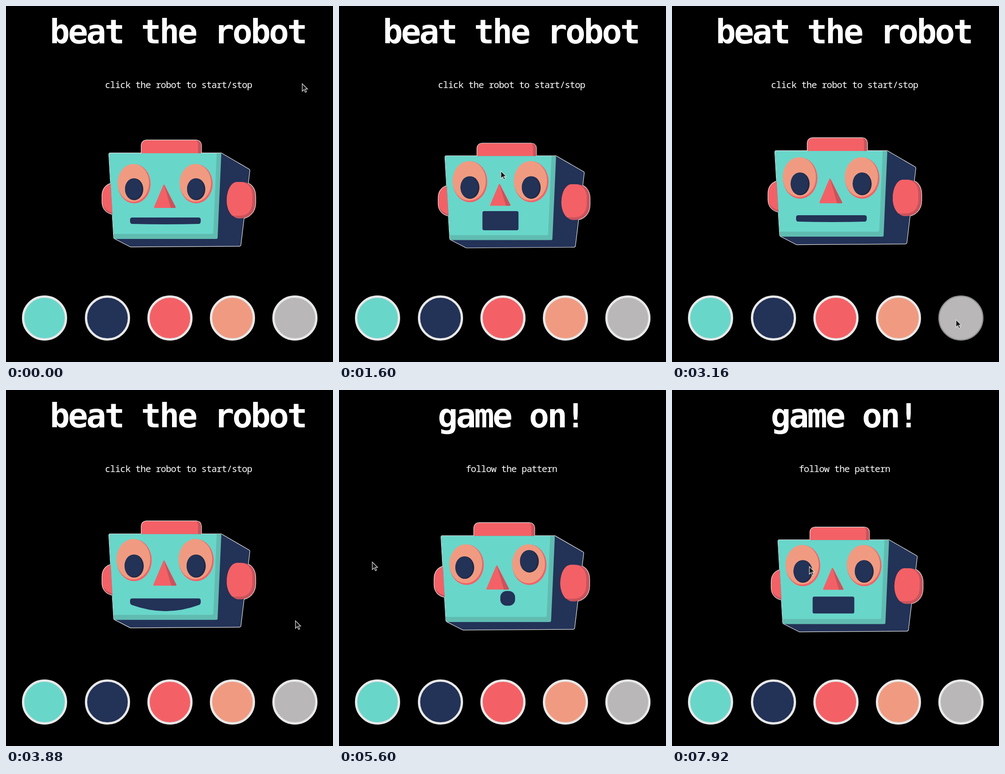
Write an HTML page that moves like this. It is 717 px wide and 781 px high and loops after 8000 ms.

```html
<!DOCTYPE html>
<html lang="en">
<head>
<meta charset="utf-8">
<title>beat the robot</title>
<style>
  html, body { margin: 0; width: 100%; height: 100%; overflow: hidden; background: #000; }
  svg { display: block; width: 100%; height: 100%; }
  #title { font: bold 73px "DejaVu Sans Mono", monospace; letter-spacing: -3.9px; fill: #fff; }
  #hint { font: 20px "Noto Sans Mono", "DejaVu Sans Mono", monospace; letter-spacing: -0.88px; fill: #fff; }
  .teal { fill: #69d6ca; } .tealDark { fill: #60bcb1; }
  .navy { fill: #233257; } .navyDark { fill: #1d2948; }
  .red { fill: #f36166; } .redDark { fill: #ca535b; }
  .peach { fill: #f09b81; }
  #outline { fill: none; stroke: #e8e8e8; stroke-width: 2.4; stroke-linejoin: round; }
</style>
</head>
<body>
<svg viewBox="0 0 717 781">
  <defs>
    <path id="hat" d="M297 324V305Q298 295 308 294.500H417Q427 295 428 305V324Z"/>
    <path id="box" d="M228 323H472L533 358.500Q534.500 359.500 534 362L514.500 524Q514 526.500 511 526.500L273 528 238 510Q236.500 509 236.500 507L226 326Q226 323 228 323Z"/>
    <path id="earL" d="M232 389C218 392 211 403 211 416V430C211 444 220 455 236 457Z"/>
    <path id="earR" d="M506 386H518C537 387 547 400 547 418V432C547 452 533 466 514 466H508C494 463 484 446 484 427C484 405 493 387 506 386Z"/>
  </defs>
  <text id="title" y="82"></text>
  <text id="hint" y="179.500"></text>
  <g id="robot">
    <g id="outline">
      <use href="#hat"/><use href="#box"/><use href="#earL"/><use href="#earR"/>
    </g>
    <use href="#earL" class="red"/>
    <path class="redDark" d="M212 436C214 447 222 455 236 457V454C224 451 216 445 212 436Z"/>
    <use href="#hat" class="red"/>
    <path class="redDark" d="M417 294.500Q427 295 428 305V324H421V303Q421 297 417 294.500Z"/>
    <use href="#box" class="navy"/>
    <path class="tealDark" d="M228 323H470Q472 323 472 326L464 508Q464 511 461 511H240L238 510Q236.500 509 236.500 507L226 326Q226 323 228 323Z"/>
    <path class="teal" d="M228 323H462L454.500 497Q454 500 451 500H236L226 326Q226 323 228 323Z"/>
    <use href="#earR" class="redDark"/>
    <path class="red" d="M506 386H514C531 387 540 399 540 415V429C540 448 530 460 513 460H496C488 452 484 440 484 427C484 405 493 387 506 386Z"/>
    <g id="eyes"></g>
    <path id="nose" class="red"/>
    <path id="noseShade" class="redDark"/>
    <path id="smile" class="navy"/>
    <rect id="mouth" class="navy"/>
  </g>
  <g id="buttons"></g>
  <path id="cursor" d="M.5 .5V17L4.500 13.200 7.300 19.500 10 18.300 7.200 12.200H12.300Z" fill="#161616" stroke="#e4e4e4" stroke-width="1.200"/>
</svg>
<script>
const LOOP = 8000, TAU = Math.PI * 2;
const HEAD = 322; // face top in robot coordinates
const $ = id => document.getElementById(id);
const rad = deg => deg * Math.PI / 180;

function add(parent, tag, attrs) {
  const el = document.createElementNS("http://www.w3.org/2000/svg", tag);
  set(el, attrs);
  return parent.appendChild(el);
}
function set(el, attrs) {
  for (const k in attrs) el.setAttribute(k, attrs[k]);
}
function oval(el, cx, cy, rx, ry) {
  set(el, { cx, cy, rx, ry });
}

const eyes = [281, 417].map(x => ({
  x,
  parts: ["red", "peach", "navyDark", "navy"].map(c => add($("eyes"), "ellipse", { class: c }))
}));
const colors = ["#69d6ca", "#233257", "#f36166", "#f09b81", "#bab7b8"];
const buttons = colors.map((color, i) => {
  const cx = 84.5 + Math.ceil(137.25 * i);
  return { cx, color, el: add($("buttons"), "circle", { cx, cy: 684.5 }) };
});

// time, x, y of the pointer tip
const trail = [
  [0, 649, 170], [880, 649, 170], [1000, 592, 208], [1200, 592, 208],
  [1600, 355, 361], [1720, 290, 440], [1960, 112, 664], [2120, 118, 692],
  [2440, 262, 687], [2620, 362, 690], [2840, 492, 692], [3160, 622, 688],
  [3440, 674, 660], [3720, 676, 596], [3880, 634.5, 506], [4200, 500, 436],
  [4520, 376, 398], [4920, 374, 398], [5120, 240, 388], [5400, 78, 378],
  [5600, 72.5, 377], [5680, 70.5, 376], [7560, 70.5, 376], [7760, 190, 381],
  [7920, 300.5, 387], [8000, 318, 388]
];
function pointer(t) {
  const i = Math.max(1, trail.findIndex(k => k[0] > t));
  const [a, b] = [trail[i - 1], trail[i]];
  const u = (t - a[0]) / (b[0] - a[0]);
  return { x: a[1] + (b[1] - a[1]) * u, y: a[2] + (b[2] - a[2]) * u };
}

function setText(game) {
  $("title").textContent = game ? "game on!" : "beat the robot";
  $("hint").textContent = game ? "follow the pattern" : "click the robot to start/stop";
  $("title").setAttribute("x", game ? 216.5 : 96);
  $("hint").setAttribute("x", game ? 278 : 217);
}

// angle of the bob: 0 is the lowest point
function bobAngle(t, mode) {
  if (mode === "hover") return TAU * (t - 1600) / 1760 - rad(106);
  if (mode === "game") return TAU * (t - 5600) / 2160 - rad(63);
  return TAU * (t < 1500 ? t : t - 2755) / 1620;
}

function drawRobot(t, mode) {
  const a = bobAngle(t, mode);
  const p = (1 - Math.cos(a)) / 2;
  const swing = Math.cos(TAU * (t - 5600) / 2160);
  const game = mode === "game", hover = mode === "hover";

  const [x, y, sx, sy] = hover ? [217, 306.2 - 10 * p, .988, .98]
    : game ? [208, 293 - 11 * p, 1.012, 1.004]
    : [210, 293 - 10 * p, 1, 1];
  $("robot").setAttribute("transform", `translate(${x} ${y}) scale(${sx} ${sy}) translate(-210 -293)`);

  const ey = HEAD + 68 - 15 * p, rx = 36 + 3.7 * p, ry = 43 + 4.5 * p;
  const px = 20 + 1.5 * p, py = 24 + 2 * p;
  eyes.forEach(({ x, parts }, i) => {
    const cx = game && !i ? x - 4 : x;
    const cy = game ? ey + (i ? -7.5 : 6.3) * swing : HEAD + 80 - 13.5 * p;
    oval(parts[0], x, ey, rx, ry);
    oval(parts[1], x - 1.8, ey - 2, rx - 1.4, ry - 1.6);
    oval(parts[2], cx, cy, px, py);
    oval(parts[3], cx - 1.6, cy - 1, px - 1.6, py - 1.2);
  });

  const k = hover ? .89 : 1;
  const base = HEAD + 121 - 10.5 * p - (hover ? 2 : 0);
  const nh = (52 + 6 * p) * k, nw = (23.5 + 2.5 * p) * k, nx = 348.5;
  const tip = `M${nx - 4} ${base - nh + 3}Q${nx - 2.5} ${base - nh - 2} ${nx} ${base - nh + 3}`;
  $("nose").setAttribute("d", `${tip}L${nx + nw} ${base - 2}Q${nx + nw} ${base} ${nx + nw - 2} ${base}H${nx - nw + 1}Q${nx - nw - 1} ${base} ${nx - nw} ${base - 3}Z`);
  $("noseShade").setAttribute("d", `M${nx - 2} ${base - nh + 1}L${nx + nw} ${base - 2}Q${nx + nw} ${base} ${nx + nw - 2} ${base}H${nx + nw * .55}Z`);

  const grin = Math.max(0, (Math.cos(a + rad(72)) - .31) / .69);
  const dip = 480 + 37 * grin;
  $("smile").setAttribute("d", `M277 464H422q5 0 5 5v4q0 3-3 5Q350 ${dip} 275 478q-3-2-3-5v-4q0-5 5-5z`);
  $("smile").style.display = hover || game ? "none" : "";

  const mouth = $("mouth");
  mouth.style.display = hover || game ? "" : "none";
  let mx, my, w, h, r;
  if (hover) {
    const u = .5 + .5 * Math.sin(TAU * (t - 1600) / 549.6 + rad(30));
    [mx, my, w, h, r] = [348.7, HEAD + 147 - 1.8 * u, 98.5 - 24.5 * u, 35.3 + 10 * u, 4];
  } else {
    [mx, my, w, h, r] = [351 + 19 * swing, HEAD + 143.5 - 6 * swing, 34 - 2 * swing, 34 - 2 * swing, 13.5];
  }
  set(mouth, { x: mx - w / 2, y: my - h / 2, width: w, height: h, rx: r });
}

function draw(t) {
  const tip = pointer(t);
  const game = t >= 4920;
  const over = tip.x > 212 && tip.x < 545 && tip.y > 292 && tip.y < 530;
  setText(game);

  // the picture stands still for a moment before the pointer reaches the robot
  const shown = t > 1000 && t < 1240 ? 1000 : t;
  drawRobot(shown, over ? "hover" : game ? "game" : "idle");

  buttons.forEach(({ cx, color, el }, i) => {
    const hot = Math.hypot(tip.x - cx, tip.y - 684.5) < 49;
    const lit = i === 2 && t >= 6480 && t < 6980;
    set(el, {
      r: hot ? 48.2 : 47,
      fill: lit ? "#ff0000" : color,
      stroke: hot ? "#8f8f8f" : "#e8e8e8",
      "stroke-width": hot ? 2.6 : 5
    });
  });
  $("cursor").setAttribute("transform", `translate(${tip.x} ${tip.y})`);
}

const start = performance.now();
function tick() {
  draw((performance.now() - start) % LOOP);
  requestAnimationFrame(tick);
}
tick();
</script>
</body>
</html>
```
